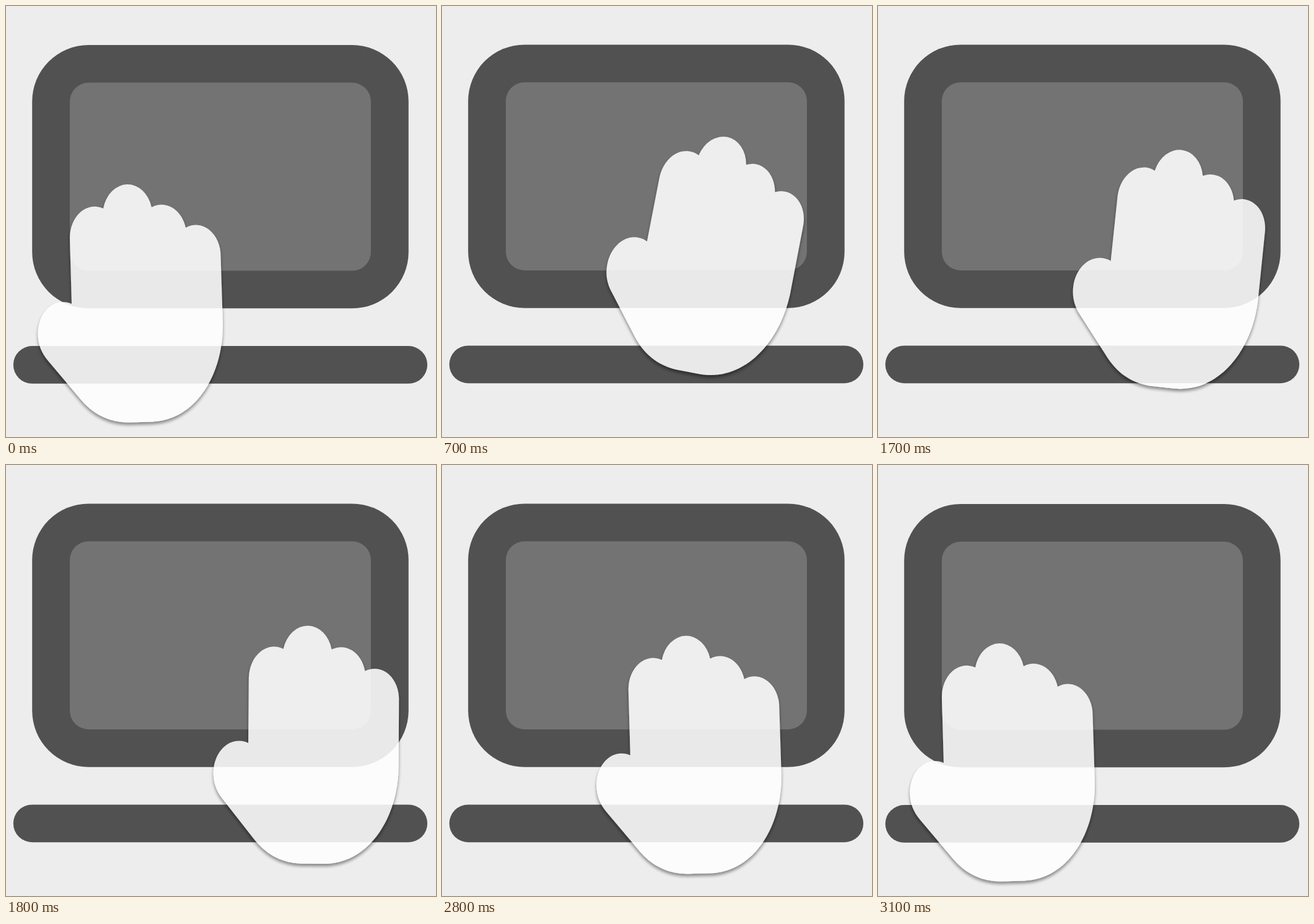
An HTML page for the animation above (3.3 s loop, 694x696 px).

```html
<!DOCTYPE html>
<html lang="en">
<head>
<meta charset="utf-8">
<title>Hand over laptop</title>
<style>
  html, body { margin: 0; width: 100%; height: 100%; overflow: hidden; background: #ededed; }
  svg { display: block; width: 100%; height: 100%; }
</style>
</head>
<body>
<svg viewBox="0 0 694 696">
  <defs>
    <filter id="shadow" filterUnits="userSpaceOnUse" x="0" y="0" width="694" height="696">
      <feDropShadow dx="0" dy="4" stdDeviation="2.6" flood-color="#000" flood-opacity=".48"/>
    </filter>
  </defs>
  <rect width="694" height="696" fill="#ededed"/>
  <g id="laptop" fill="#515151">
    <rect x="42.2" width="607.5" height="425.25" rx="91.1"/>
    <rect x="102.95" y="60.75" width="486" height="303.75" rx="30.4" fill="#737373"/>
    <rect x="11.8" y="486" width="668.25" height="60.75" rx="30.4"/>
  </g>
  <g opacity=".88">
    <g filter="url(#shadow)">
      <path id="hand" fill="#fff" d="M106 481 L103 375
        A40 50.5 0 0 1 157 327 A40.2 50 0 0 1 235 325
        A40.2 50 0 0 1 290 358 A40 50 0 0 1 346.5 404
        L350 515 C350 598 305 669 235 671.5 L198 672.5
        C170 672 145 663 122 637 L68 573
        C57 560 51.5 546 51.5 529 C51.5 501 69 478 92 478
        C97 478 102 479 106 481 Z"/>
    </g>
  </g>
</svg>
<script>
  const LOOP = 3300, TICK = 100, GLIDE = 285;
  const PIVOT = { x: 200, y: 480, turn: 0 };
  const RAISED = { x: 450, y: 390, turn: 14.2 };
  const LOWERED = { x: 491, y: 462, turn: 0 };

  // Each move begins shortly before the tick that first shows it.
  const moves = [
    { start: 509, rest: 800, from: PIVOT, to: RAISED },
    { start: 1624, rest: 2000, from: RAISED, to: LOWERED },
    { start: 2750, rest: 3100, from: LOWERED, to: PIVOT }
  ];

  const hand = document.getElementById("hand");
  const laptop = document.getElementById("laptop");
  const mix = (a, b, p) => a + (b - a) * p;
  const easeOut = t => 1 - (1 - t) ** 2;

  function draw(ms) {
    const now = Math.floor((ms % LOOP) / TICK) * TICK;
    const move = moves.filter(m => now >= m.start).pop() || moves[0];
    const moving = now >= move.start && now < move.rest;
    const t = Math.min(1, Math.max(0, (now - move.start) / GLIDE));
    const p = now >= move.rest ? 1 : easeOut(t);
    const [x, y, turn] = ["x", "y", "turn"].map(k => mix(move.from[k], move.to[k], p));

    hand.setAttribute("transform",
      `translate(${x} ${y}) rotate(${turn}) translate(${-PIVOT.x} ${-PIVOT.y})`);
    // The laptop sits slightly higher while the hand moves.
    laptop.setAttribute("transform", `translate(0 ${moving ? 62.4 : 63.1})`);
  }

  const begin = performance.now();
  function frame() {
    draw(performance.now() - begin);
    requestAnimationFrame(frame);
  }
  frame();
</script>
</body>
</html>
```
